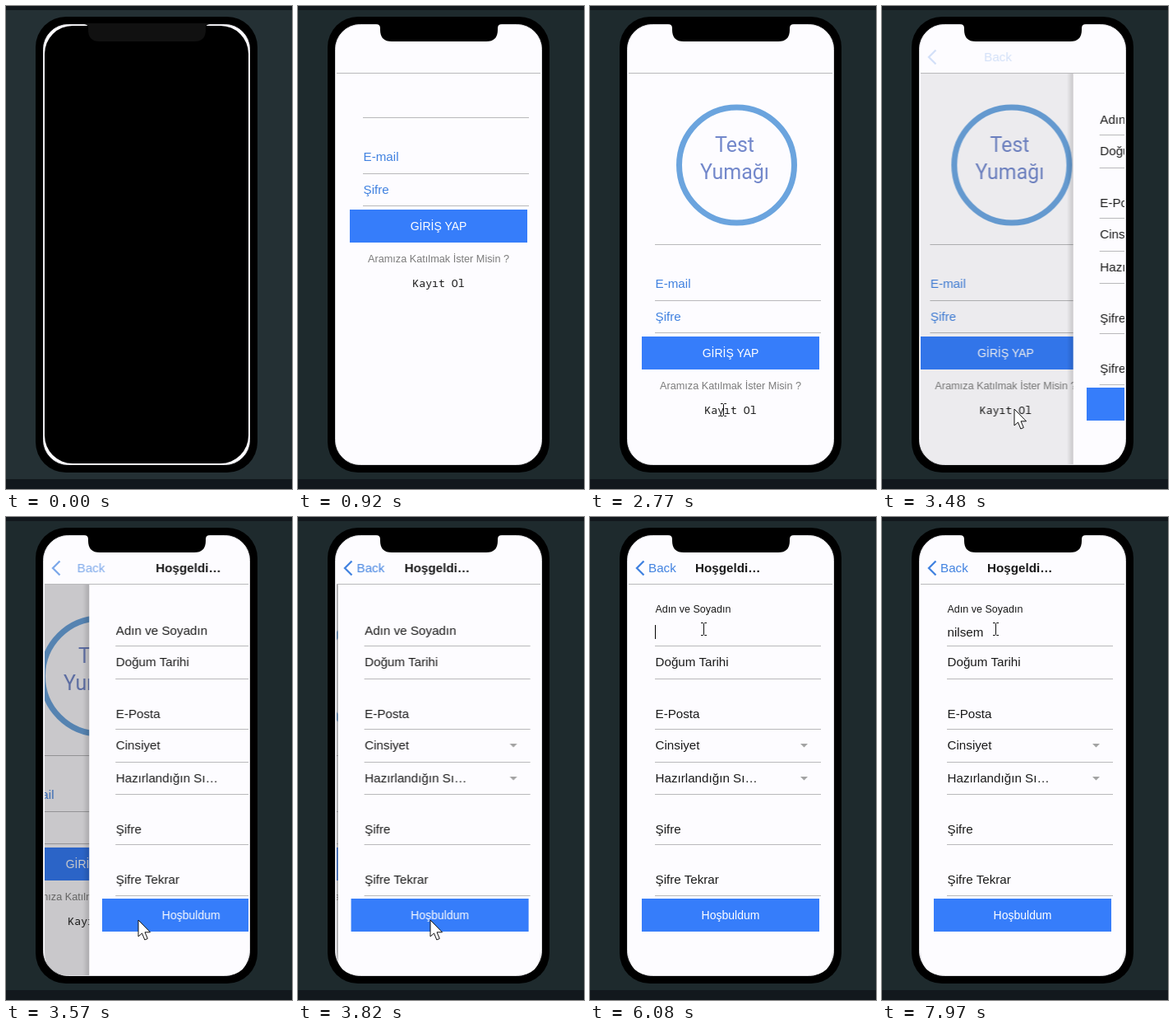
These frames come from a looping animation (348x586 px, 8 s). An HTML page:

```html
<!DOCTYPE html>
<html lang="tr">
<head>
<meta charset="utf-8">
<title>Giriş ve kayıt</title>
<style>
html, body { margin: 0; width: 100%; height: 100%; overflow: hidden; background: #1e2a2d; }
svg { display: block; width: 348px; height: 586px; }
text { font: 15.2px "Liberation Sans", Arial, sans-serif; fill: #1a1a1a; white-space: pre; }
.mid { text-anchor: middle; }
.bold { font-weight: bold; }
.blue { fill: #4182e0; }
.btn { fill: #367dfa; }
.btn-text { font-size: 14px; fill: #fff; }
.note { font-size: 12.7px; fill: #7b7b7b; }
.mono { font: 13.2px "Noto Sans Mono", monospace; }
.brand { font: 25px Roboto, sans-serif; fill: #7388cb; }
.rule { stroke: #b9b9bb; stroke-width: 1; fill: none; }

/* one loop: 8 s, 1% = 80 ms */
.a { animation: 8s step-end infinite; }
.backdrop { animation-name: backdrop; }
.splash { animation-name: splash; }
.login { animation-name: login; }
.fields { animation-name: fields; }
.logo { animation-name: logo; }
.leave { animation-name: leave; }
.dim { animation-name: dim; }
.enter { animation-name: enter; }
.back { animation-name: back; }
.back-text { animation-name: back-text; }
.float { animation-name: float; }
.typed { animation-name: typed; }
.caret { animation-name: caret; }
.mouse { animation-name: mouse; }
.arrow { animation-name: arrow; }
.beam { animation-name: beam; }

@keyframes backdrop { 0% { fill: #243034; } 1%, 100% { fill: #1e2a2d; } }
@keyframes splash { 0% { opacity: 1; } 1%, 100% { opacity: 0; } }
@keyframes login { 0% { opacity: 0; } 11.5%, 100% { opacity: 1; } }
@keyframes fields { 0% { transform: translateY(-154px); } 12.5%, 100% { transform: none; } }
@keyframes logo { 0% { opacity: 0; } 12.5%, 100% { opacity: 1; } }

/* page push */
@keyframes leave {
  0% { transform: translateX(0); }
  42.8% { transform: translateX(0); animation-timing-function: cubic-bezier(.36,.66,.04,1); }
  49.05%, 100% { transform: translateX(-82px); }
}
@keyframes dim {
  0% { opacity: 0; }
  42.8% { opacity: 0; animation-timing-function: cubic-bezier(.36,.66,.04,1); }
  49.05%, 100% { opacity: .26; }
}
@keyframes enter {
  0% { transform: translateX(256px); }
  42.8% { transform: translateX(248px); animation-timing-function: cubic-bezier(.36,.66,.04,1); }
  49.05%, 100% { transform: translateX(0); }
}
@keyframes back {
  0% { opacity: 0; }
  42.8% { opacity: 0; animation-timing-function: cubic-bezier(.36,.6,.15,1); }
  49.05%, 100% { opacity: 1; }
}
@keyframes back-text {
  0% { transform: translateX(71px); }
  42.8% { transform: translateX(71px); animation-timing-function: cubic-bezier(.36,.66,.04,1); }
  49.05%, 100% { transform: translateX(0); }
}

/* name field */
@keyframes float {
  0% { transform: translateY(0) scale(1); }
  58.6% { transform: translateY(0) scale(1); animation-timing-function: ease-in-out; }
  60.5%, 100% { transform: translateY(-27px) scale(.825); }
}
@keyframes typed {
  0% { transform: translateX(0); }
  77.1% { transform: translateX(8.5px); }
  79.25% { transform: translateX(11.8px); }
  81.25% { transform: translateX(15.2px); }
  82.85% { transform: translateX(22.8px); }
  85% { transform: translateX(31.3px); }
  87.1%, 100% { transform: translateX(44.5px); }
}
@keyframes caret {
  0% { opacity: 0; }
  58.6% { opacity: 1; }
  65.25% { opacity: 0; }
  71.87% { opacity: 1; }
  94.25%, 100% { opacity: 0; }
}

/* pointer */
@keyframes mouse {
  0% { transform: translate(-30px, 330px); }
  22% { transform: translate(-20px, 330px); animation-timing-function: ease-in-out; }
  33.5% { transform: translate(161px, 489px); }
  49% { transform: translate(161px, 489px); animation-timing-function: ease-in-out; }
  57% { transform: translate(137px, 134px); }
  62%, 100% { transform: translate(137px, 135px); }
}
@keyframes arrow {
  0% { opacity: 1; }
  32.5% { opacity: 0; }
  42.8% { opacity: 1; }
  56%, 100% { opacity: 0; }
}
@keyframes beam {
  0% { opacity: 0; }
  32.5% { opacity: 1; }
  42.8% { opacity: 0; }
  56%, 100% { opacity: 1; }
}
</style>
</head>
<body>
<svg viewBox="0 0 348 586" xmlns="http://www.w3.org/2000/svg">
  <defs>
    <clipPath id="screen"><rect x="47" y="22" width="248" height="534" rx="29"/></clipPath>
    <clipPath id="body"><path d="M47 82H295V527Q295 556 266 556H76Q47 556 47 527Z"/></clipPath>
    <linearGradient id="shade">
      <stop offset="0" stop-opacity="0"/>
      <stop offset="1" stop-opacity=".15"/>
    </linearGradient>
  </defs>

  <rect width="348" height="586" fill="#12181d"/>
  <rect class="a backdrop" y="5" width="348" height="569"/>

  <!-- phone -->
  <rect x="36" y="13" width="270" height="553" rx="37"/>
  <rect x="45.5" y="22.5" width="251" height="534" rx="30" fill="#fdfcff" stroke="#dcdce0"/>

  <!-- login page -->
  <g class="a login">
    <g clip-path="url(#body)">
      <g class="a leave">
        <g class="a logo">
          <circle cx="178.5" cy="193" r="70" fill="none" stroke="#6ba4de" stroke-width="7"/>
          <text class="brand mid" x="176" y="177">Test</text>
          <text class="brand mid" x="176" y="210">Yumağı</text>
        </g>
        <g class="a fields">
          <path class="rule" d="M79 289.500H281M79 357.500H281M79 396.500H281"/>
          <text class="blue" x="79.5" y="342">E-mail</text>
          <text class="blue" x="79.5" y="382">Şifre</text>
          <rect class="btn" x="63" y="401" width="216" height="40"/>
          <text class="btn-text mid" x="171" y="426">GİRİŞ YAP</text>
          <text class="note mid" x="171" y="465">Aramıza Katılmak İster Misin ?</text>
          <text class="mono mid" x="171" y="495">Kayıt Ol</text>
        </g>
      </g>
      <rect class="a dim" x="47" y="82" width="248" height="474"/>
    </g>
    <path class="rule" d="M47 81.500H295"/>
  </g>

  <!-- sign-up page -->
  <g clip-path="url(#body)">
    <g class="a enter">
      <rect x="39" y="82" width="8" height="474" fill="url(#shade)"/>
      <rect x="47" y="82" width="248" height="474" fill="#fdfcff"/>
      <path class="rule" d="M79 156.500H281M79 196.500H281M79 257.500H281M79 297.500H281M79 336.500H281M79 397.500H281M79 459.500H281"/>
      <text x="79.5" y="145">nilsem</text>
      <g class="a typed">
        <rect x="79.3" y="128" width="52" height="24" fill="#fdfcff"/>
        <rect class="a caret" x="79" y="131" width="1" height="17"/>
      </g>
      <g transform="translate(79.5 143)"><text class="a float">Adın ve Soyadın</text></g>
      <text x="79.5" y="181">Doğum Tarihi</text>
      <text x="79.5" y="244">E-Posta</text>
      <text x="79.5" y="282">Cinsiyet</text>
      <text x="79.5" y="322">Hazırlandığın Sı…</text>
      <path d="M256 275h9l-4.500 4.500zM256 315h9l-4.500 4.500z" fill="#a3a3a3"/>
      <text x="79.5" y="384">Şifre</text>
      <text x="79.5" y="445">Şifre Tekrar</text>
      <rect class="btn" x="63" y="463" width="216" height="40"/>
      <text class="btn-text mid" x="171" y="488">Hoşbuldum</text>
    </g>
  </g>
  <g clip-path="url(#screen)">
    <g class="a enter"><text class="bold" x="128" y="67">Hoşgeldi…</text></g>
    <g class="a back">
      <path d="M65.500 53.500L57 62L65.500 70.500" fill="none" stroke="#4182e0" stroke-width="2.300"/>
      <text class="blue a back-text" x="71" y="67">Back</text>
    </g>
  </g>

  <!-- dark start screen, then notch -->
  <rect class="a splash" x="47" y="24" width="248" height="531" rx="34"/>
  <path id="notch" d="M95 21H248V22Q243 22 243 27V29Q243 43 229 43H114Q100 43 100 29V27Q100 22 95 22Z"/>
  <use class="a splash" href="#notch" fill="#111"/>

  <!-- pointer -->
  <g class="a mouse">
    <path class="a arrow" d="M0 0V20L4.500 16L7.800 24L11.300 22.500L8 14.800H14.500Z" fill="#fff" stroke="#111" stroke-width="1"/>
    <path class="a beam" d="M-2 -6.500H0.500L1.500 -5.500L2.500 -6.500H5M1.500 -5.500V7.500M-2 8.500H0.500L1.500 7.500L2.500 8.500H5" fill="none" stroke="#111" stroke-width="1"/>
  </g>
</svg>
</body>
</html>
```
